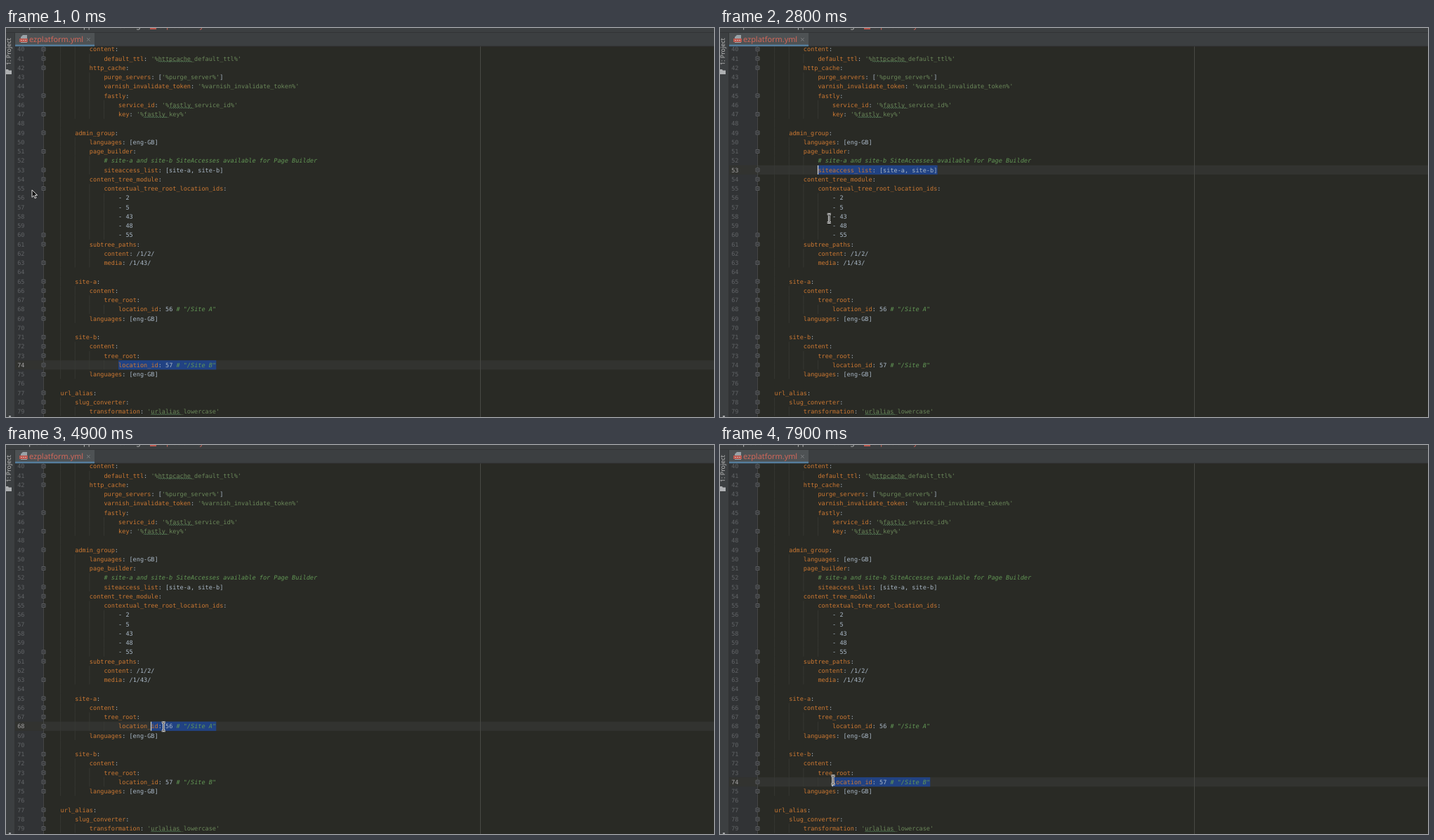
Recreate the animation shown at these times as an HTML page. Size 1008 by 555 pixels, loop 8000 ms.

```html
<!DOCTYPE html>
<html lang="en">
<head>
<meta charset="utf-8">
<title>YAML editor</title>
<style>
  html, body { margin: 0; width: 100%; height: 100%; overflow: hidden; background: #292a25; }
  svg { display: block; width: 100vw; height: 100vh; }
  text { white-space: pre; text-rendering: geometricPrecision; }
  .code { font: 8.56px "DejaVu Sans Mono", monospace; fill: #a9b7c6; }
  .key { fill: #cc7832; }
  .string { fill: #6a8759; }
  .comment { fill: #629755; font-style: italic; }
  .ui { font-family: "Noto Sans", "Open Sans", sans-serif; fill: #bbb; }
</style>
</head>
<body>
<svg id="stage" viewBox="0 0 1008 555">
  <rect width="1008" height="555" fill="#292a25"/>
  <rect x="12" width="41.5" height="555" fill="#313335"/>
  <g id="marks"></g>
  <path d="M53.5 26V555" stroke="#4b4d4d" stroke-width=".8"/>
  <path d="M675.5 26V555" stroke="#484944"/>
  <g id="guides" stroke="#3a3b36" stroke-width=".8"></g>
  <g id="folds" fill="#313335" stroke="#65686a" stroke-width=".8"></g>
  <g id="lines"></g>
  <rect id="caret" width="1.3" height="13" fill="#d0d0d0"/>

  <g id="frame">
    <rect width="1008" height="26" fill="#3c3f41"/>
    <rect width="12" height="555" fill="#3c3f41"/>
    <path d="M12.5 7V555" stroke="#323435" stroke-width=".8"/>
    <path d="M0 6.5H1008M127 26H1008" stroke="#303234" stroke-width=".8"/>
    <g class="ui" font-size="10.9">
      <text x="21" y="0">ezplatform</text>
      <text x="104" y="0">app</text>
      <text x="160" y="0">config</text>
      <text x="217" y="0" style="fill:#d1675a">ezplatform.yml</text>
    </g>
    <rect x="205" width="9" height="2" fill="#b9584f"/>
    <rect x="13" y="7" width="113" height="19" fill="#4e5254"/>
    <rect x="13" y="23.7" width="113" height="2.5" fill="#557d9c"/>
    <path d="M24 10h6v11h-9v-8z" fill="#9aa3a8"/>
    <rect x="19" y="15" width="12" height="5" fill="#b9584f"/>
    <path d="M21 17.5h8" stroke="#e0b4ae" stroke-dasharray="2 1"/>
    <text class="ui" x="33" y="20.3" font-size="10.9" style="fill:#d1675a">ezplatform.yml</text>
    <path d="M115.2 14.2l4.4 4.4m0-4.4l-4.4 4.4" stroke="#7d8082"/>
    <text class="ui" font-size="8.9" transform="translate(7.3 53) rotate(-90)">1: Project</text>
    <path d="M0 59h3l1 1.5h4V66H0z" fill="#afb1b3"/>
    <rect x="4" y="553" width="3" height="2" fill="#a0a2a4"/>
  </g>

  <path id="arrow" d="M0 0V10.5L2.5 8.2 4.2 12 6 11.2 4.3 7.5H7.6Z" fill="#111" stroke="#eee" stroke-width=".9"/>
  <g id="beam" fill="none">
    <path d="M-2.6-6H-.8L0-5.3.8-6H2.6M0-5.3V5.3M-2.6 6H-.8L0 5.3.8 6H2.6" stroke="#f4f4f4" stroke-width="2.8"/>
    <path d="M-2.6-6H-.8L0-5.3.8-6H2.6M0-5.3V5.3M-2.6 6H-.8L0 5.3.8 6H2.6" stroke="#111" stroke-width=".9"/>
  </g>
</svg>
<script>
const FIRST = 40, ROW = 13.25, LEFT = 57, CHAR = 5.155, LOOP = 8000;
const source = `
            content:
                default_ttl: '%httpcache_default_ttl%'
            http_cache:
                purge_servers: ['%purge_server%']
                varnish_invalidate_token: '%varnish_invalidate_token%'
                fastly:
                    service_id: '%fastly_service_id%'
                    key: '%fastly_key%'

        admin_group:
            languages: [eng-GB]
            page_builder:
                # site-a and site-b SiteAccesses available for Page Builder
                siteaccess_list: [site-a, site-b]
            content_tree_module:
                contextual_tree_root_location_ids:
                    - 2
                    - 5
                    - 43
                    - 48
                    - 55
            subtree_paths:
                content: /1/2/
                media: /1/43/

        site-a:
            content:
                tree_root:
                    location_id: 56 # "/Site A"
            languages: [eng-GB]

        site-b:
            content:
                tree_root:
                    location_id: 57 # "/Site B"
            languages: [eng-GB]

    url_alias:
        slug_converter:
            transformation: 'urlalias_lowercase'`.split('\n').slice(1);

const $ = id => document.getElementById(id);
const colX = col => LEFT + col * CHAR;
const rowY = line => 30.25 + (line - FIRST) * ROW;
const indentOf = text => text.search(/\S/);

function add(parent, tag, attrs, content = '') {
  const el = document.createElementNS('http://www.w3.org/2000/svg', tag);
  for (const name in attrs) el.setAttribute(name, attrs[name]);
  el.textContent = content;
  return parent.appendChild(el);
}

function drawTokens(text, y) {
  const pattern = /(#.*)|('[^']*')|([\w-]+(?=:))|(\S+?(?=['\s]|$)|\[)/g;
  const line = add($('lines'), 'text', { class: 'code', x: colX(indentOf(text)), y });
  let last = indentOf(text);
  for (const match of text.matchAll(pattern)) {
    const kind = match[1] ? 'comment' : match[2] ? 'string' : match[3] ? 'key' : '';
    if (!kind) continue;
    add(line, 'tspan', {}, text.slice(last, match.index));
    add(line, 'tspan', { class: kind }, match[0]);
    last = match.index + match[0].length;
  }
  add(line, 'tspan', {}, text.slice(last));
}

function drawTypo(text, y) {
  const typo = /(?<=['%])(httpcache|fastly|urlalias)/.exec(text);
  if (!typo) return;
  let d = `M${colX(typo.index)} ${y + 5}`;
  for (let i = 0; i < typo[0].length * CHAR / 3; i++) d += 'l1.5 -1.5l1.5 1.5';
  add($('lines'), 'path', { d, fill: 'none', stroke: '#5d8d62', 'stroke-width': .8 });
}

const lineNumbers = source.map((text, i) => {
  const line = FIRST + i, y = rowY(line), next = source[i + 1] || '';
  const depth = text ? indentOf(text) : indentOf(next);
  for (let col = 4; col < depth; col += 4)
    add($('guides'), 'path', { d: `M${colX(col)} ${y - ROW / 2}v${ROW}` });
  if (text) {
    drawTokens(text, y + 3.1);
    drawTypo(text, y);
    if (text.endsWith(':') || indentOf(next) < depth)
      add($('folds'), 'path', { d: `M51 ${y - 2.5}h5v5h-5zM52 ${y}h3` });
  }
  return add($('lines'), 'text', { class: 'code', x: 16.2, y: y + 3.1 }, line);
});

const currentRow = add($('marks'), 'rect', { x: 13, width: 995, height: ROW, fill: '#323330' });
const usage = add($('marks'), 'rect', { height: ROW, fill: '#344134' });
const selection = add($('marks'), 'rect', { height: ROW, fill: '#214283' });

// Pointer keys: time, x, y
const pointer = [
  [0, 37, 231], [400, 321, 190], [500, 321, 190], [800, 321, 203], [1000, 321, 203],
  [1100, 319, 202], [1900, 145, 202], [2000, 145, 202], [2200, 145, 208], [2300, 145, 208],
  [2600, 142, 210], [2700, 142, 210], [3000, 182, 395], [3100, 182, 395], [3500, 222, 408],
  [4000, 297, 403], [4200, 299, 401], [4300, 299, 401], [4400, 302, 399], [4500, 302, 399],
  [5200, 166, 404], [5300, 164, 403], [5500, 164, 403], [5600, 163, 402], [5700, 163, 402],
  [5800, 162, 399], [5900, 162, 399], [6600, 308, 480], [6700, 306, 480], [6900, 285, 479],
  [7000, 253, 481], [7300, 166, 483], [7400, 166, 483], [7700, 163, 481], [7800, 163, 481],
  [7900, 161, 478]
];
const drags = [
  { line: 74, press: -1, release: 0 },
  { line: 53, press: 1100, release: 2600 },
  { line: 68, press: 4400, release: 5800 },
  { line: 74, press: 6700, release: LOOP }
];
const usages = [
  { line: 53, from: 4400, to: 4900 },
  { line: 68, from: 6700, to: 7300 }
];

function pointerAt(t) {
  const i = pointer.findIndex(key => key[0] > t);
  if (i < 0) return pointer.at(-1).slice(1);
  const [t0, x0, y0] = pointer[i - 1], [t1, x1, y1] = pointer[i];
  const k = (t - t0) / (t1 - t0);
  return [x0 + (x1 - x0) * k, y0 + (y1 - y0) * k];
}

function place(rect, line, from, to) {
  rect.setAttribute('x', colX(from));
  rect.setAttribute('y', rowY(line) - ROW / 2);
  rect.setAttribute('width', (to - from) * CHAR);
}

function render(t) {
  const [x, y] = pointerAt(t);
  const shape = x < 54 ? 'arrow' : 'beam';
  for (const id of ['arrow', 'beam']) $(id).style.display = id === shape ? '' : 'none';
  $(shape).setAttribute('transform', `translate(${x} ${y})`);

  const drag = drags.findLast(d => t >= d.press);
  const text = source[drag.line - FIRST], start = indentOf(text), end = text.length;
  // The selection runs one step ahead of the drawn pointer.
  const col = Math.round((pointerAt(t + 100)[0] - LEFT) / CHAR);
  const caretCol = t >= drag.release ? start : Math.max(start, Math.min(end, col));
  place(selection, drag.line, caretCol, end);
  currentRow.setAttribute('y', rowY(drag.line) - ROW / 2);
  lineNumbers.forEach((el, i) =>
    el.style.fill = FIRST + i === drag.line ? '#a4a3a3' : '#606366');

  const blinkOn = Math.floor((t - 2400) / 500) % 2 === 0;
  $('caret').setAttribute('x', colX(caretCol) - .6);
  $('caret').setAttribute('y', rowY(drag.line) - 6.5);
  $('caret').style.display = drag.press >= 0 && (t < drag.release || blinkOn) ? '' : 'none';

  const hit = usages.find(u => t >= u.from && t < u.to);
  usage.style.display = hit ? '' : 'none';
  if (hit) {
    const hitText = source[hit.line - FIRST];
    place(usage, hit.line, indentOf(hitText), hitText.indexOf(':'));
  }
}

const begin = performance.now();
function tick() {
  const t = (performance.now() - begin) % LOOP;
  render(Math.floor(t / 100) * 100);
  requestAnimationFrame(tick);
}
tick();
</script>
</body>
</html>
```
